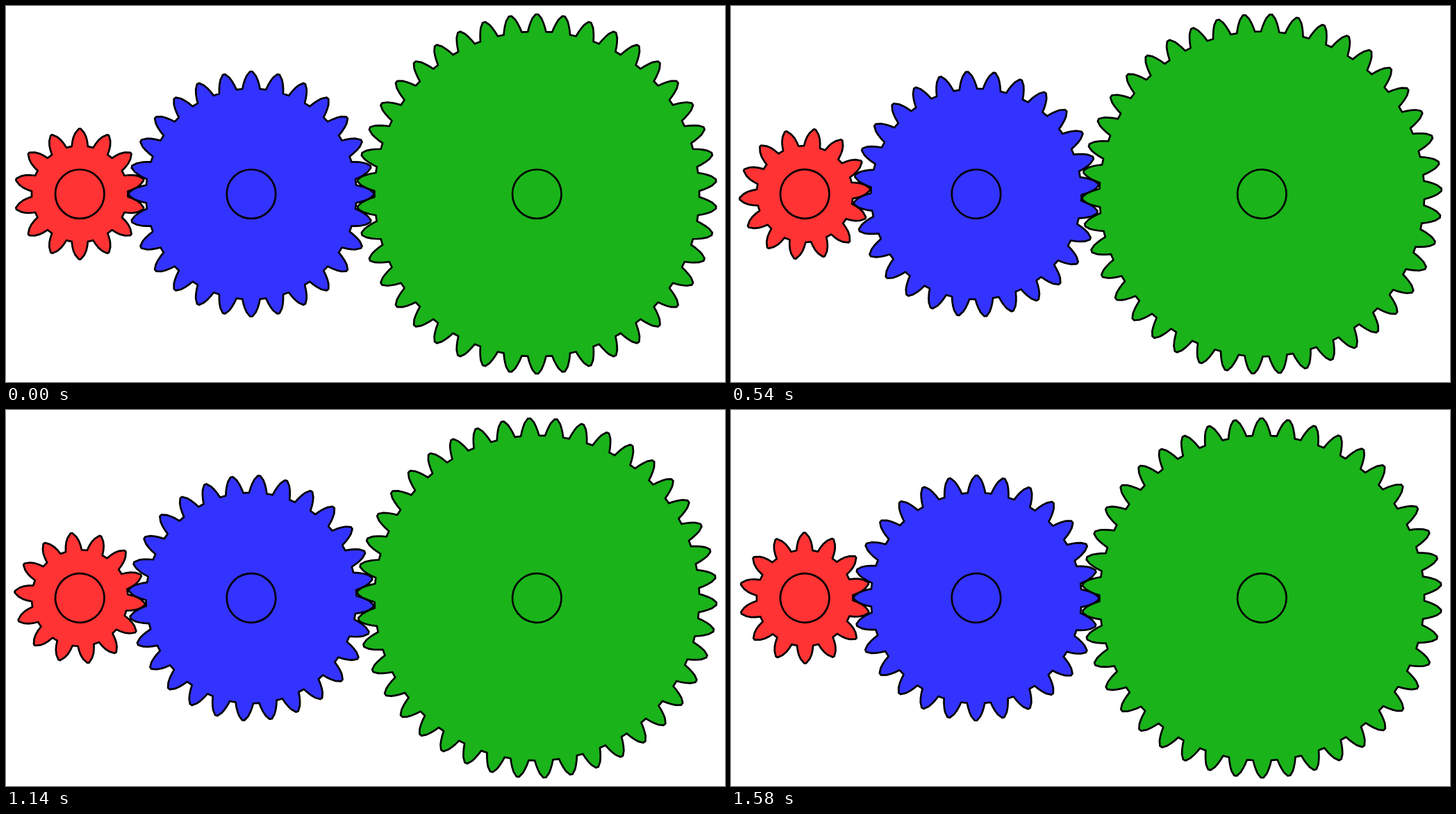
These frames come from a looping animation (1035 by 541 pixels, 1.6 s). An HTML page with a canvas:

```html
<!DOCTYPE html>
<html lang="en">
<head>
<meta charset="utf-8">
<title>Gear train</title>
<style>
  html, body { margin: 0; overflow: hidden; background: #fff; }
  canvas { display: block; }
</style>
</head>
<body>
<canvas id="stage" width="1035" height="541"></canvas>
<script>
const ctx = document.getElementById('stage').getContext('2d');
const MODULE = 11.75, CENTER_Y = 270.5, LOOP = 1600, STEP = 20;

const gears = [
  { x: 106.25, teeth: 14, color: '#ff3333', dir: 1 },
  { x: 353, teeth: 28, color: '#3333ff', dir: -1 },
  { x: 764.25, teeth: 42, color: '#1ab31a', dir: 1 },
];

// Half of one tooth, root to tip: [angle from the tooth axis, radius]
function toothFlank(teeth) {
  const unit = Math.PI / 8 / teeth;
  const radius = teeth * MODULE / 2;
  return [
    [6 * unit, radius - 1.1 * MODULE],
    [5 * unit, radius - 0.5 * MODULE],
    [4 * unit, radius],
    [3 * unit - teeth ** -1.7, radius + 0.5 * MODULE],
    [2 * unit - teeth ** -1.2, radius + MODULE],
  ];
}

function gearPath(teeth) {
  const path = new Path2D();
  const flank = toothFlank(teeth);
  const tip = [0, teeth * MODULE / 2 + MODULE];
  const rootMid = [8 * Math.PI / 8 / teeth, flank[0][1]];
  const tooth = [
    ...flank.map(([a, r]) => [-a, r]), tip, ...flank.reverse(), rootMid,
  ];
  for (let i = 0; i < teeth; i++) {
    const axis = i * 2 * Math.PI / teeth - Math.PI / 2;
    for (const [a, r] of tooth) {
      path.lineTo(r * Math.cos(axis + a), r * Math.sin(axis + a));
    }
  }
  path.closePath();
  return path;
}

for (const gear of gears) gear.path = gearPath(gear.teeth);

const hub = new Path2D();
hub.arc(0, 0, 3 * MODULE, 0, 2 * Math.PI);

function draw(now) {
  // Every gear advances by one tooth per loop
  const progress = Math.floor((now % LOOP) / STEP) * STEP / LOOP;
  ctx.fillStyle = '#fff';
  ctx.fillRect(0, 0, 1035, 541);
  ctx.lineWidth = 2.7;
  ctx.lineJoin = 'round';
  for (const { x, teeth, color, dir, path } of gears) {
    ctx.save();
    ctx.translate(x, CENTER_Y);
    ctx.rotate(dir * progress * 2 * Math.PI / teeth);
    ctx.fillStyle = color;
    ctx.fill(path);
    ctx.stroke(path);
    ctx.stroke(hub);
    ctx.restore();
  }
}

const start = performance.now();
function tick() {
  draw(performance.now() - start);
  requestAnimationFrame(tick);
}
tick();
</script>
</body>
</html>
```
